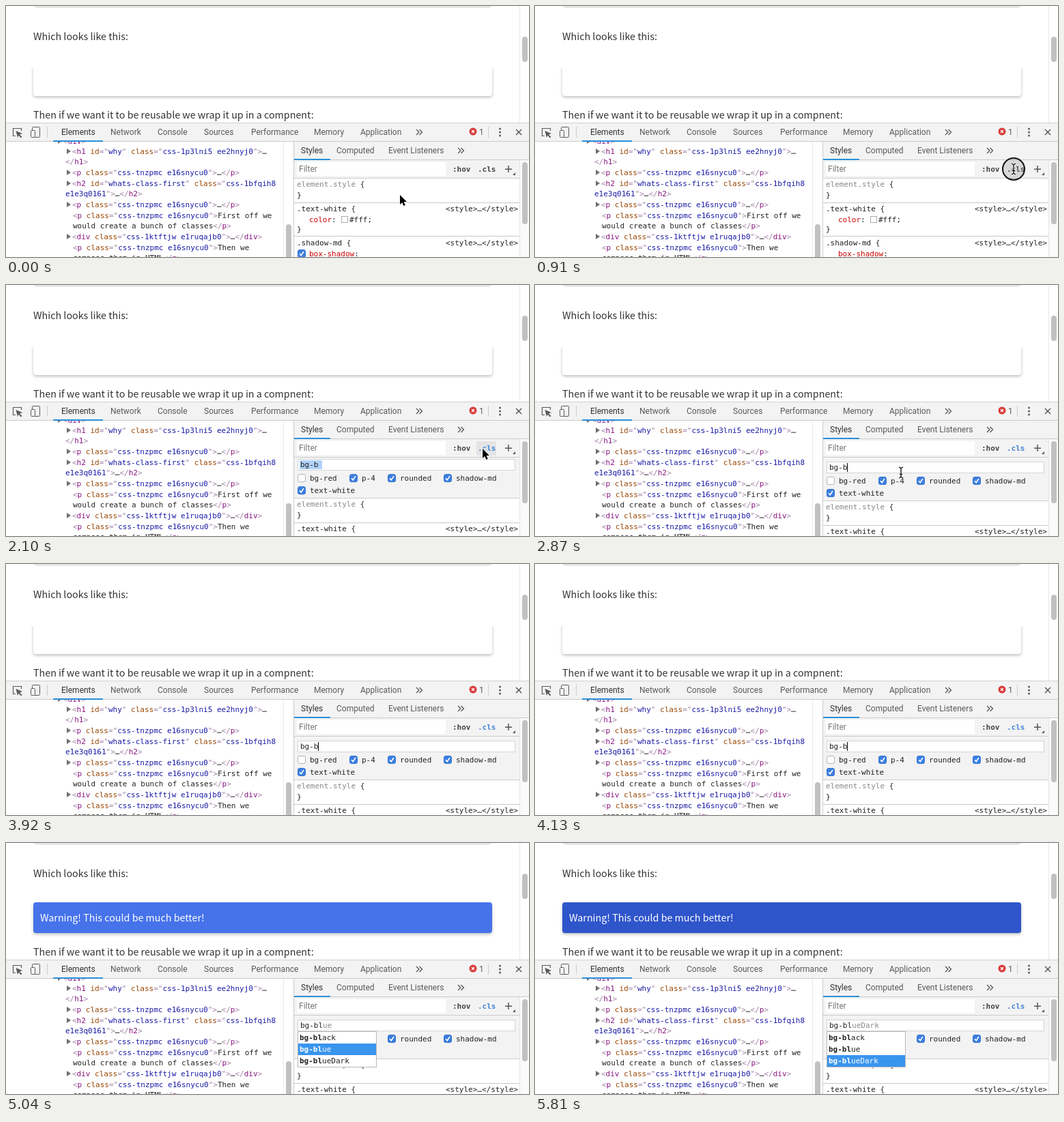
Recreate the animation shown at these times as an HTML page with a canvas. Size 766 px wide and 368 px high, loop 5880 ms.

```html
<!DOCTYPE html>
<html lang="en">
<head>
<meta charset="utf-8">
<title>Toggling classes</title>
<style>
html, body { margin: 0; width: 100%; height: 100%; overflow: hidden; background: #fff; }
canvas { display: block; width: 766px; height: 368px; }
</style>
</head>
<body>
<canvas id="stage" width="766" height="368"></canvas>
<script>
const W = 766, H = 368, LOOP = 5880;
const g = document.getElementById('stage').getContext('2d');
const MONO = '11px "DejaVu Sans Mono", monospace';
const UI = '12px Roboto, "Liberation Sans", sans-serif';
const PAGE = '14.3px "Noto Sans CJK JP", "Noto Sans CJK SC", "Noto Sans CJK", "Noto Sans", sans-serif';
const INK = { t: '#a080a4', n: '#881280', a: '#994500', v: '#1a1aa6', x: '#222', g: '#888', r: '#c80000' };

const TIME = {
  move: [80, 720], press: [840, 1050], arrow: 1400, open: 2007,
  leave: [2560, 2820], focus: 2800, hide: 3800, black: 4270, blue: 4970, dark: 5400
};

const clamp = v => Math.max(0, Math.min(1, v));
const part = (t, [a, b]) => clamp((t - a) / (b - a));
const ease = p => p * p * (3 - 2 * p);
const mix = (a, b, p) => a + (b - a) * p;

function box(x, y, w, h, fill) {
  g.fillStyle = fill;
  g.fillRect(x, y, w, h);
}

function round(x, y, w, h, r, fill, stroke) {
  g.beginPath();
  g.roundRect(x, y, w, h, r);
  if (fill) { g.fillStyle = fill; g.fill(); }
  if (stroke) { g.strokeStyle = stroke; g.lineWidth = 1; g.stroke(); }
}

function text(s, x, y, color, font = MONO) {
  g.font = font;
  g.fillStyle = color;
  g.fillText(s, x, y);
  return x + g.measureText(s).width;
}

// Pieces are split by "|"; the first letter of each picks its ink.
function code(line, x, y) {
  for (const s of line.split('|')) x = text(s.slice(1), x, y, INK[s[0]]);
}

function path(points, color, width, closed) {
  g.beginPath();
  points.forEach(([x, y], i) => i ? g.lineTo(x, y) : g.moveTo(x, y));
  if (closed) g.closePath();
  g.strokeStyle = color;
  g.lineWidth = width;
  g.stroke();
}

function shape(points, color) {
  g.beginPath();
  points.forEach(([x, y]) => g.lineTo(x, y));
  g.closePath();
  g.fillStyle = color;
  g.fill();
}

function clipTo(x, y, w, h, draw) {
  g.save();
  g.beginPath();
  g.rect(x, y, w, h);
  g.clip();
  draw();
  g.restore();
}

function page(t) {
  box(0, 0, W, 171, '#fff');
  round(40.5, -20, 671, 21.5, 4, null, '#c4c4c4');
  text('Which looks like this:', 40, 50, '#333', PAGE);
  const fill = t < TIME.black ? '#fff' : t < TIME.blue ? '#000' : t < TIME.dark ? '#4673ea' : '#2f55cb';
  g.save();
  g.shadowColor = 'rgba(0,0,0,.26)';
  g.shadowBlur = 4;
  g.shadowOffsetY = 2;
  round(40, 87, 672, 45, 4, fill);
  g.restore();
  if (t < TIME.black) box(36, 83, 680, 8, '#fff');
  text('Warning! This could be much better!', 50, 115, '#fff', PAGE);
  text('Then if we want it to be reusable we wrap it up in a compnent:', 40, 165, '#333', PAGE);
  box(752, 0, 1, 171, '#e8e8e8');
  round(756, 45, 8, 37, 4, '#c1c1c1');
}

function chevrons(x, y) {
  for (const d of [0, 4.5]) path([[x + d, y - 4], [x + d + 4, y], [x + d, y + 4]], '#555', 1.3);
}

function toolbar() {
  box(0, 171, W, 28, '#f3f3f3');
  box(0, 171, W, 1, '#cfcfcf');
  box(0, 198, W, 1, '#ccc');
  path([[14, 190.5], [10.5, 190.5], [10.5, 179.5], [22.5, 179.5], [22.5, 183]], '#5a5a5a', 1.2);
  shape([[14.5, 183], [24, 187], [20, 188.5], [23.5, 192], [22, 193.5], [18.5, 189.8], [17, 193]], '#5a5a5a');
  round(38.5, 177.5, 11, 15, 1, null, '#5a5a5a');
  round(36.5, 182.5, 6, 10, 1, '#f3f3f3', '#5a5a5a');
  box(60, 177, 1, 16, '#ccc');
  [['Elements', 81], ['Network', 153], ['Console', 222], ['Sources', 290], ['Performance', 359],
   ['Memory', 451], ['Application', 519]].forEach(([s, x], i) => text(s, x, 189, i ? '#5a5a5a' : '#333', UI));
  box(69, 197, 73, 2, '#2b8fd9');
  chevrons(601, 185);
  g.beginPath();
  g.arc(684, 184, 5.5, 0, 7);
  g.fillStyle = '#d93a3a';
  g.fill();
  path([[682, 182], [686, 186]], '#fff', 1.2);
  path([[686, 182], [682, 186]], '#fff', 1.2);
  text('1', 693, 189, '#5a5a5a', UI);
  box(706, 177, 1, 16, '#ccc');
  for (const y of [180, 185, 190]) {
    g.beginPath();
    g.arc(723.5, y, 1.5, 0, 7);
    g.fillStyle = '#5a5a5a';
    g.fill();
  }
  path([[747, 181], [755, 189]], '#555', 1.5);
  path([[755, 181], [747, 189]], '#555', 1.5);
}

const open = (name, cls) => `t<|n${name}|a class|t="|v${cls}|t">`;
const openId = (name, id, cls) => `t<|n${name}|a id|t="|v${id}|t"|a class|t="|v${cls}`;
const close = name => `t</|n${name}|t>`;
const PARA = open('p', 'css-tnzpmc e16snycu0');

// y, x, line, has an arrow
const TREE = [
  [198, 84, 't<|ndiv|t>', 1],
  [213, 97, openId('h1', 'why', 'css-1p3lni5 ee2hnyj0') + '|t">|x…', 1],
  [228, 87, close('h1')],
  [244, 97, `${PARA}|x…|${close('p')}`, 1],
  [260, 97, openId('h2', 'whats-class-first', 'css-1bfqih8'), 1],
  [275, 87, 've1e3q0161|t">|x…|' + close('h2')],
  [291, 97, `${PARA}|x…|${close('p')}`, 1],
  [307, 98, PARA + '|xFirst off we'],
  [322, 98, 'xwould create a bunch of classes|' + close('p')],
  [338, 97, `${open('div', 'css-1ktftjw e1ruqajb0')}|x…|${close('div')}`, 1],
  [354, 98, PARA + '|xThen we'],
  [369, 98, 'xcompose them in HTML|' + close('p')]
];

function tree() {
  clipTo(0, 199, 421, H - 199, () => {
    box(0, 199, 421, H - 199, '#fff');
    for (const [y, x, line, arrow] of TREE) {
      if (arrow) shape([[x - 8, y - 4], [x - 2, y], [x - 8, y + 4]], '#6e6e6e');
      code(line, x, y + 4);
    }
    box(406, 199, 1, H, '#e8e8e8');
    round(410, 320, 8, 60, 4, '#c1c1c1');
  });
  box(421, 199, 1, H - 199, '#ccc');
}

function check(x, y, on) {
  round(x + .5, y - 5.5, 11, 11, 2.5, on ? '#3c7fe0' : '#fff', on ? '#3473d2' : '#b5b5b5');
  if (on) path([[x + 3, y + .2], [x + 5.2, y + 2.7], [x + 9, y - 3]], '#fff', 1.6);
}

function rules(off, hover) {
  const row = (line, x, y) => code(line, x, y + off + 4);
  const rule = y => box(422, y + off, 330, 1, '#c8c8c8');
  box(422, 253, 330, H - 253, '#fff');
  row('gelement.style |x{', 426, 261);
  row('x}', 426, 277);
  rule(288);
  row('x.text-white {', 426, 297);
  row('x<style>…</style>', 644, 297);
  row('rcolor|x:', 444, 313);
  g.strokeStyle = '#aaa';
  g.lineWidth = 1;
  g.strokeRect(491.5, 308.5 + off, 9, 9);
  row('x#fff;', 503, 313);
  row('x}', 426, 327);
  rule(337);
  row('x.shadow-md {', 426, 347);
  row('x<style>…</style>', 644, 347);
  row('rbox-shadow|x:', 444, 363);
  if (hover) check(427, 363 + off, true);
}

function classPane(t, off) {
  const d = off - 64;
  box(422, 253, 330, off, '#f3f3f3');
  box(422, 252 + off, 330, 1, '#ccc');
  g.strokeStyle = '#d4d4d4';
  g.lineWidth = 1;
  box(427, 259 + d, 319, 17, '#fff');
  g.strokeRect(427.5, 259.5 + d, 318, 16);
  const y = 271 + d;
  if (t < TIME.focus) box(430, 261 + d, 33, 13, '#b0d2fb');
  if (t < TIME.black) {
    const end = text('bg-b', 431, y, '#222');
    const lit = Math.floor((t - TIME.focus) / 500) % 2 === 0;
    if (t >= TIME.focus && lit) box(Math.floor(end), 261 + d, 1, 13, '#000');
  } else {
    const end = text('bg-bl', 431, y, '#222');
    text(WORDS[choice(t)], end, y, '#888');
  }
  [['bg-red', 427, 287], ['p-4', 503, 287], ['rounded', 559, 287], ['shadow-md', 641, 287],
   ['text-white', 427, 305]].forEach(([s, x, cy], i) => {
    check(x, cy + d, i > 0);
    text(s, x + 18, cy + d + 4, '#222');
  });
}

const WORDS = ['ack', 'ue', 'ueDark'];
const choice = t => t < TIME.blue ? 0 : t < TIME.dark ? 1 : 2;

function popup(t) {
  box(427, 276, 116, 53, '#b8b8b8');
  box(428, 277, 114, 51, '#fff');
  WORDS.forEach((word, i) => {
    const on = i === choice(t), ink = on ? '#fff' : '#222', y = 277 + 17 * i;
    if (on) box(428, y, 114, 17, '#3a95ee');
    const x = text('bg-bl', 430, y + 12, ink, 'bold ' + MONO);
    text(word, x, y + 12, ink);
  });
}

function styles(t) {
  const off = 64 * clamp((t - TIME.open) / 100);
  clipTo(422, 253, 330, H - 253, () => {
    rules(off, t < 350);
    if (off) classPane(t, off);
  });
  box(422, 199, 344, 54, '#f3f3f3');
  box(422, 225, 344, 1, '#ccc');
  box(422, 252, 330, 1, '#ccc');
  text('Styles', 432, 216, '#333', UI);
  text('Computed', 484, 216, '#5a5a5a', UI);
  text('Event Listeners', 560, 216, '#5a5a5a', UI);
  chevrons(662, 212);
  box(422, 224, 53, 2, '#2b8fd9');
  box(426, 229, 218, 20, '#fff');
  text('Filter', 429, 243, '#757575', UI);
  text(':hov', 654, 243, '#444', 'bold ' + MONO);
  if (t > TIME.arrow && t < TIME.leave[0] + 60) box(689, 229, 29, 21, '#e4e4e4');
  text('.cls', 691, 243, off ? '#4384d8' : '#444', 'bold ' + MONO);
  box(731, 238.5, 10, 1.5, '#555');
  box(735.2, 234, 1.5, 10, '#555');
  shape([[746, 244], [746, 248], [742, 248]], '#555');
  box(752, 226, 14, H - 226, '#fafafa');
  box(752, 226, 1, H - 226, '#e4e4e4');
  round(756, 229, 8, 91, 4, '#c1c1c1');
  if (t >= TIME.black) popup(t);
}

const ARROW = [[0, 0], [0, 14], [3.2, 11], [5.3, 16], [7.8, 15], [5.7, 10.2], [10, 10]];

function arrow(x, y) {
  const pts = ARROW.map(([a, b]) => [x + a, y + b]);
  g.lineJoin = 'round';
  path(pts, '#fff', 2.4, true);
  shape(pts, '#000');
  g.lineJoin = 'miter';
}

function beam(x, y) {
  for (const [color, width] of [['#fff', 3], ['#000', 1.3]]) {
    path([[x - 3, y - 8], [x, y - 6.5], [x + 3, y - 8]], color, width);
    path([[x - 3, y + 8], [x, y + 6.5], [x + 3, y + 8]], color, width);
    path([[x, y - 6.5], [x, y + 6.5]], color, width);
    path([[x - 2, y + 2.5], [x + 2, y + 2.5]], color, width);
  }
}

function pointer(t) {
  if (t >= TIME.hide) return;
  const a = ease(part(t, TIME.move)), b = ease(part(t, TIME.leave)), c = ease(part(t, [TIME.press[1], TIME.arrow]));
  const x = mix(mix(mix(577, 701, a), 698, c), 536, b);
  const y = mix(mix(mix(277, 239, a), 240, c), 275, b);
  if (t >= TIME.press[0] && t < TIME.press[1]) {
    g.beginPath();
    g.arc(x, y, 16, 0, 7);
    g.fillStyle = 'rgba(130,130,130,.25)';
    g.fill();
    g.strokeStyle = '#111';
    g.lineWidth = 2;
    g.stroke();
  }
  const typing = t < TIME.arrow ? y < 249 : b > .6;
  (typing ? beam : arrow)(x, y);
}

function draw(t) {
  page(t);
  toolbar();
  tree();
  styles(t);
  pointer(t);
}

const start = performance.now();
function tick() {
  draw((performance.now() - start) % LOOP);
  requestAnimationFrame(tick);
}
tick();
</script>
</body>
</html>
```
